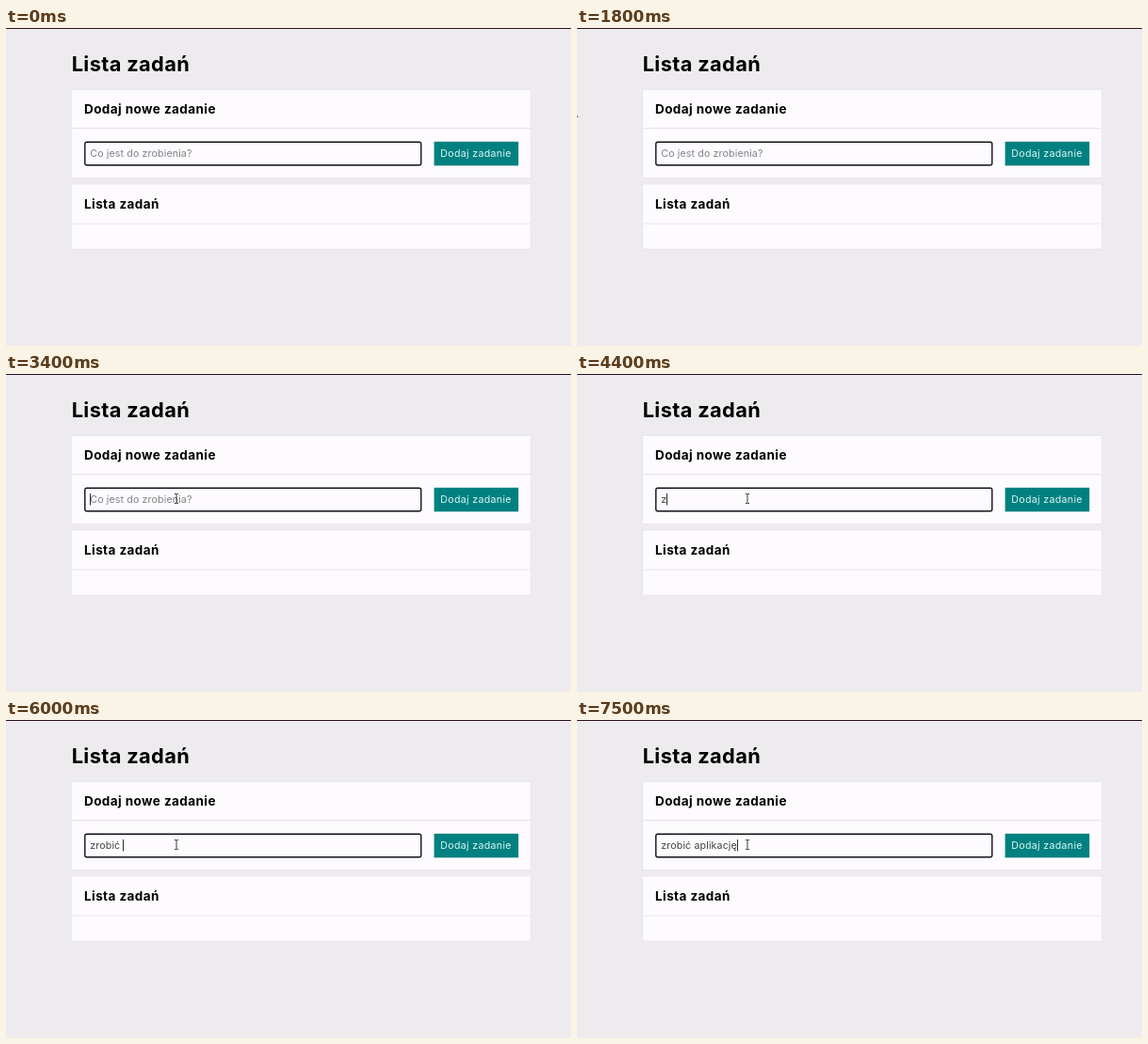
An HTML page that plays this animation: 600x338 px, repeating every 8000 ms.

```html
<!DOCTYPE html>
<html lang="pl">
<head>
<meta charset="utf-8">
<title>Lista zadań</title>
<style>
  html, body { margin: 0; width: 100%; height: 100%; overflow: hidden; background: #edebee; }
  svg { display: block; width: 100vw; height: 100vh; font-family: Inter, "Open Sans", sans-serif; }
  text { white-space: pre; }
  .card { fill: #fdfbfe; stroke: #e5e3e6; stroke-width: .8; }
  .rule { stroke: #e7e5e8; stroke-width: 1.2; }
  .h1 { font-size: 21.8px; font-weight: 700; letter-spacing: .36px; }
  .h2 { font-size: 13.5px; font-weight: 700; letter-spacing: .42px; }
  .body { font-size: 10.67px; letter-spacing: .12px; }
  .label { font-size: 10.67px; letter-spacing: .3px; fill: #dcf5f5; }
</style>
</head>
<body>
<svg viewBox="0 0 600 338">
  <rect width="600" height="338" fill="#edebee"/>
  <rect width="600" height="1" fill="#2c0d1f"/>
  <text class="h1" x="69.7" y="46.3">Lista zadań</text>

  <rect class="card" x="69.7" y="65.3" width="487.8" height="94.2"/>
  <path class="rule" d="M70 106.7H557"/>
  <text class="h2" x="83" y="90.5">Dodaj nowe zadanie</text>
  <rect x="83.8" y="121.3" width="357" height="24.5" rx="2" fill="#fdfbfe" stroke="#111015" stroke-width="1.4"/>
  <rect x="454.6" y="120.8" width="89.6" height="25.5" fill="#008080"/>
  <text class="label" x="461.3" y="136.6">Dodaj zadanie</text>

  <rect class="card" x="69.7" y="165.9" width="487.8" height="69.1"/>
  <path class="rule" d="M70 208H557"/>
  <text class="h2" x="83" y="191.6">Lista zadań</text>

  <text id="hint" class="body" x="89.3" y="136.6" fill="#838185">Co jest do zrobienia?</text>
  <text id="entry" class="body" x="89.3" y="136.6" fill="#434245"></text>
  <rect id="caret" y="127" width="1" height="12.4" fill="#2c2b2e"/>

  <path id="arrow" d="M0 0V11.3L2.6 8.9L4.3 12.8L6 12L4.4 8.3H8Z" fill="#fff" stroke="#111" stroke-width=".8"/>
  <path id="beam" d="M-2 -5H-.6L0 -4.5L.6 -5H2M0 -4.5V4.5M-2 5H-.6L0 4.5L.6 5H2" fill="none" stroke="#222" stroke-width=".9"/>
</svg>
<script>
const LOOP = 8000, STEP = 100;
const BLINK = 530, BLINK_START = 205;

// Bursts of typing: a steady gap between keys within each.
const bursts = [
  { at: 4400, gap: 200, keys: "zro" },
  { at: 5300, gap: 200, keys: "bić" },
  { at: 6000, gap: 166, keys: " aplikację" }
];

const edge = [-7.2, 86], field = [125, 134.5], rest = [181, 132.5];

const $ = id => document.getElementById(id);
const hint = $("hint"), entry = $("entry"), caret = $("caret");
const arrow = $("arrow"), beam = $("beam");

const clamp = (v, lo, hi) => Math.min(hi, Math.max(lo, v));
const progress = (t, from, to) => clamp((t - from) / (to - from), 0, 1);
const easeOut = k => 1 - (1 - k) ** 3;
const easeInOut = k => k * k * (3 - 2 * k);
const mix = (a, b, k) => a.map((v, i) => v + (b[i] - v) * k);
const show = (el, on) => el.setAttribute("visibility", on ? "visible" : "hidden");

const typedAt = t => bursts.map(({ at, gap, keys }) =>
  keys.slice(0, clamp(Math.floor((t - at) / gap) + 1, 0, keys.length))).join("");

function pointerAt(t) {
  const arrived = mix(edge, field, easeOut(progress(t, 1800, 2600)));
  return mix(arrived, rest, easeInOut(progress(t, 2600, 3100)));
}

function draw(now) {
  const t = Math.floor((now % LOOP) / STEP) * STEP;

  const text = typedAt(t);
  if (entry.textContent !== text) entry.textContent = text;
  const end = text ? entry.getComputedTextLength() : 0;
  caret.setAttribute("x", Math.round(89.1 + end));
  show(hint, !text);
  show(caret, text || Math.floor((t - BLINK_START) / BLINK) % 2 === 0);

  const [x, y] = pointerAt(t);
  const inField = x > 83 && y > 120;
  show(arrow, t >= 1800 && !inField);
  show(beam, inField);
  (inField ? beam : arrow).setAttribute("transform", `translate(${x} ${y})`);
}

const start = performance.now();
function tick() {
  draw(performance.now() - start);
  requestAnimationFrame(tick);
}
tick();
</script>
</body>
</html>
```
